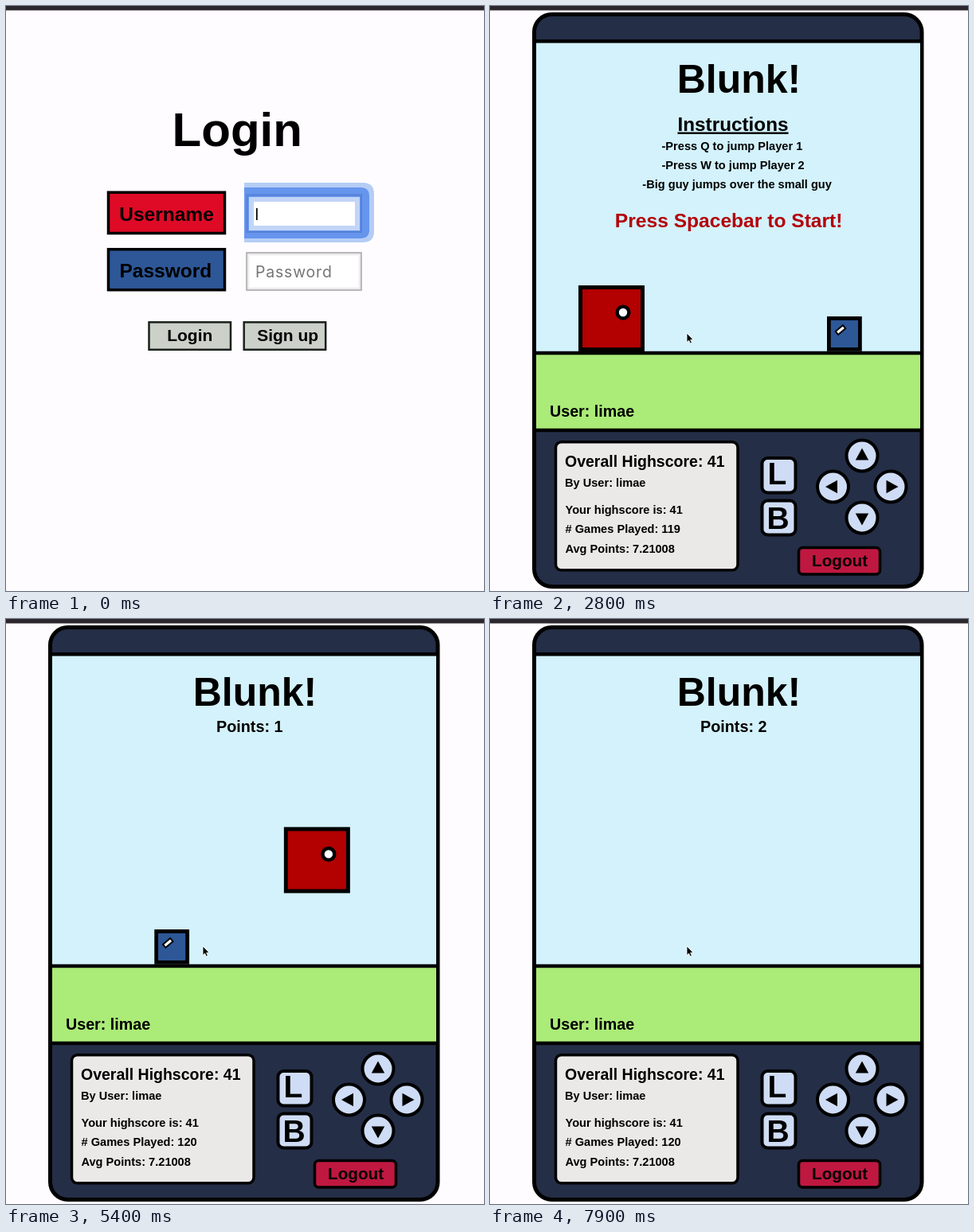
Recreate the animation shown at these times as an HTML page. Size 600 by 735 pixels, loop 8000 ms.

```html
<!DOCTYPE html>
<html lang="en">
<head>
<meta charset="utf-8">
<title>Two player jump game</title>
<style>
  html, body { margin: 0; width: 100%; height: 100%; overflow: hidden; background: #fefcff; }
  svg { display: block; width: 600px; height: 735px; }
  text { font: bold 14.6px "Liberation Sans", Arial, sans-serif; white-space: pre; }
  .field { font: 19.5px Inter, "Open Sans", sans-serif; letter-spacing: .8px; }
  .box { stroke: #000; stroke-width: 3.5; }
  .key { fill: #cfdcf5; stroke: #000; stroke-width: 4; }
  .button { fill: #cbd0c8; stroke: #1b211d; stroke-width: 2.5; }
  .line { stroke: #000; stroke-width: 4.6; }
</style>
</head>
<body>
<svg viewBox="0 0 600 735">
  <defs>
    <clipPath id="stage"><rect x="53" y="8" width="491.5" height="724" rx="24"/></clipPath>
    <g id="input">
      <rect x="302.2" y="237.2" width="143.6" height="46.6" fill="#fff" stroke="#b9b9b9" stroke-width="2.4"/>
      <rect x="304.4" y="239.4" width="139.2" height="42.2" fill="none" stroke="#eee" stroke-width="2"/>
    </g>
  </defs>
  <rect width="600" height="735" fill="#fefcff"/>
  <rect width="600" height="5.5" fill="#2b272c"/>

  <g id="login">
    <text x="208.6" y="176" style="font-size:60px">Login</text>
    <rect class="box" x="128.5" y="234.2" width="146" height="51.3" fill="#de0a26"/>
    <text x="142.3" y="270" style="font-size:24.5px">Username</text>
    <rect class="box" x="128.5" y="305.7" width="146" height="51" fill="#2d5797"/>
    <text x="142.5" y="341" style="font-size:24.5px">Password</text>
    <use href="#input"/>
    <use href="#input" y="73"/>
    <g id="ring">
      <path d="M299 222H448Q462 222 462 236V283Q462 297 448 297H299Z" fill="#b5cdf5"/>
      <path d="M299 228H445Q456 228 456 239V281Q456 292 445 292H299Z" fill="#6695ee"/>
      <rect x="302.5" y="237.5" width="143.5" height="46.5" fill="none" stroke="#5581d6" stroke-width="2"/>
      <rect x="305" y="240" width="139" height="42" fill="#c2d5f7"/>
      <rect x="311" y="246" width="127" height="30" fill="#fff"/>
    </g>
    <text id="name" class="field" x="312.5" y="268.5"></text>
    <text id="hint" class="field" x="313" y="341" fill="#757575">Password</text>
    <g id="dots">
      <circle cx="318.5" cy="335.5" r="3.4"/><circle cx="328.5" cy="335.5" r="3.4"/><circle cx="338.5" cy="335.5" r="3.4"/>
    </g>
    <rect class="button" x="179.5" y="397.3" width="102.5" height="34.5"/>
    <text x="202.2" y="421" style="font-size:21px">Login</text>
    <rect class="button" x="298.7" y="397.3" width="102.5" height="34.5"/>
    <text x="315.2" y="421" style="font-size:21px">Sign up</text>
  </g>

  <g id="game">
    <rect x="55.5" y="10.5" width="486.5" height="719" rx="22" fill="#242e47" stroke="#000" stroke-width="5"/>
    <rect x="58" y="44" width="482" height="392" fill="#d3f2fc"/>
    <rect x="58" y="436" width="482" height="97" fill="#abeb78"/>
    <path class="line" d="M55 44.2H542M55 436H542M55 533H542"/>
    <text x="312.5" y="108.5" text-anchor="middle" style="font-size:50px">Blunk!</text>
    <text id="points" x="264" y="141.5" style="font-size:19.8px"></text>
    <g id="intro">
      <text x="235.5" y="156.5" text-decoration="underline" style="font-size:24.3px">Instructions</text>
      <text x="215.5" y="180.5">-Press Q to jump Player 1</text>
      <text x="215.5" y="205">-Press W to jump Player 2</text>
      <text x="191.3" y="229.3">-Big guy jumps over the small guy</text>
      <text x="156.8" y="278" fill="#b30009" style="font-size:24.6px">Press Spacebar to Start!</text>
    </g>
    <text x="75" y="516" style="font-size:19.7px">User: limae</text>

    <rect class="box" x="82.5" y="547.7" width="228.5" height="161" rx="7" fill="#ebe9e8"/>
    <text x="94" y="579" style="font-size:19.5px">Overall Highscore: 41</text>
    <text x="94" y="603.5">By User: limae</text>
    <text x="94.5" y="637.5">Your highscore is: 41</text>
    <text id="played" x="94.5" y="662"></text>
    <text x="94.5" y="686.5">Avg Points: 7.21008</text>

    <rect class="key" x="341.5" y="568" width="42" height="43.5" rx="7"/>
    <rect class="key" x="341.5" y="621.5" width="42" height="43" rx="7"/>
    <text x="348.5" y="601" style="font-size:39px">L</text>
    <text x="347.5" y="657" style="font-size:39px">B</text>
    <g id="pad"></g>
    <rect class="box" x="387.5" y="680.5" width="102" height="33.5" rx="5" fill="#bf1840"/>
    <text x="404" y="704" style="font-size:20.7px">Logout</text>

    <g clip-path="url(#stage)">
      <g id="red">
        <rect x="2.5" y="2.5" width="78" height="78" fill="#b30000" stroke="#000" stroke-width="5"/>
        <circle cx="56" cy="34" r="7.4" fill="#fff" stroke="#000" stroke-width="4.4"/>
      </g>
      <g id="blue">
        <rect x="2.4" y="2.4" width="39" height="39" fill="#2d5797" stroke="#000" stroke-width="4.8"/>
        <rect x="-6" y="-2.6" width="12" height="5.2" fill="#fff" stroke="#000" stroke-width="2" transform="translate(17 17) rotate(-40)"/>
      </g>
    </g>
  </g>

  <path id="mouse" d="M0 0V11.5L2.6 9.2L4.4 13L6.4 12L4.7 8.4L8 8Z" stroke="#fff" stroke-width=".9"/>
</svg>
<script>
const $ = id => document.getElementById(id);
const show = (id, on) => $(id).style.display = on ? '' : 'none';
const move = (id, x, y) => $(id).setAttribute('transform', `translate(${x} ${y})`);

const LOOP = 8000, USER = 'limae';
const ENTER = 2100, START = 2900;              // game screen opens, round starts
const FIRST = 3182, PERIOD = 1700, SCORE = 1500; // crossings of the two players
const mousePath = [[900, 233, 407], [1150, 131, 257], [1400, 190, 385], [1600, 247, 411]];

$('pad').innerHTML = [[467, 565, 0], [503, 604, 90], [467, 643, 180], [430.5, 604, 270]].map(([x, y, a]) =>
  `<g transform="translate(${x} ${y}) rotate(${a})"><circle class="key" r="19.5"/><path d="M0-9.5L8.2 5.5H-8.2Z"/></g>`).join('');

function mouseAt(t) {
  const i = mousePath.findIndex(p => p[0] > t);
  if (i < 0) return [247, 411];
  if (i === 0) return [233, 407];
  const [t0, x0, y0] = mousePath[i - 1], [t1, x1, y1] = mousePath[i];
  const u = (t - t0) / (t1 - t0), e = u * u * (3 - 2 * u);
  return [x0 + (x1 - x0) * e, y0 + (y1 - y0) * e];
}

function drawLogin(t) {
  const dots = t < 700 ? 0 : Math.min(3, 1 + Math.floor((t - 700) / 100));
  $('name').textContent = USER.slice(0, 1 + Math.floor(t / 100));
  show('ring', t < 1700);
  move('ring', 0, t < 500 ? 0 : 73);
  show('hint', !dots);
  [...$('dots').children].forEach((d, i) => d.style.display = i < dots ? '' : 'none');
}

function drawGame(t) {
  const playing = t >= START;
  show('intro', !playing);
  show('points', playing);
  $('points').textContent = 'Points: ' + Math.max(0, Math.floor((t - FIRST - SCORE) / PERIOD) + 1);
  $('played').textContent = '# Games Played: ' + (playing ? 120 : 119);
  if (!playing) {
    move('red', 111, 351);
    move('blue', 423, 390);
    return;
  }
  const s = t < FIRST ? -100 : (t - FIRST) % PERIOD;
  const jump = 117 * Math.max(0, 1 - ((s - 398) / 250) ** 2);
  move('red', -30 + .73 * s, 351 - jump);
  move('blue', 584.6 - .7675 * s, 390);
}

function frame() {
  const t = performance.now() % LOOP, inGame = t >= ENTER;
  show('login', !inGame);
  show('game', inGame);
  inGame ? drawGame(t) : drawLogin(t);
  show('mouse', t >= 900);
  move('mouse', ...mouseAt(t));
  requestAnimationFrame(frame);
}
frame();
</script>
</body>
</html>
```
